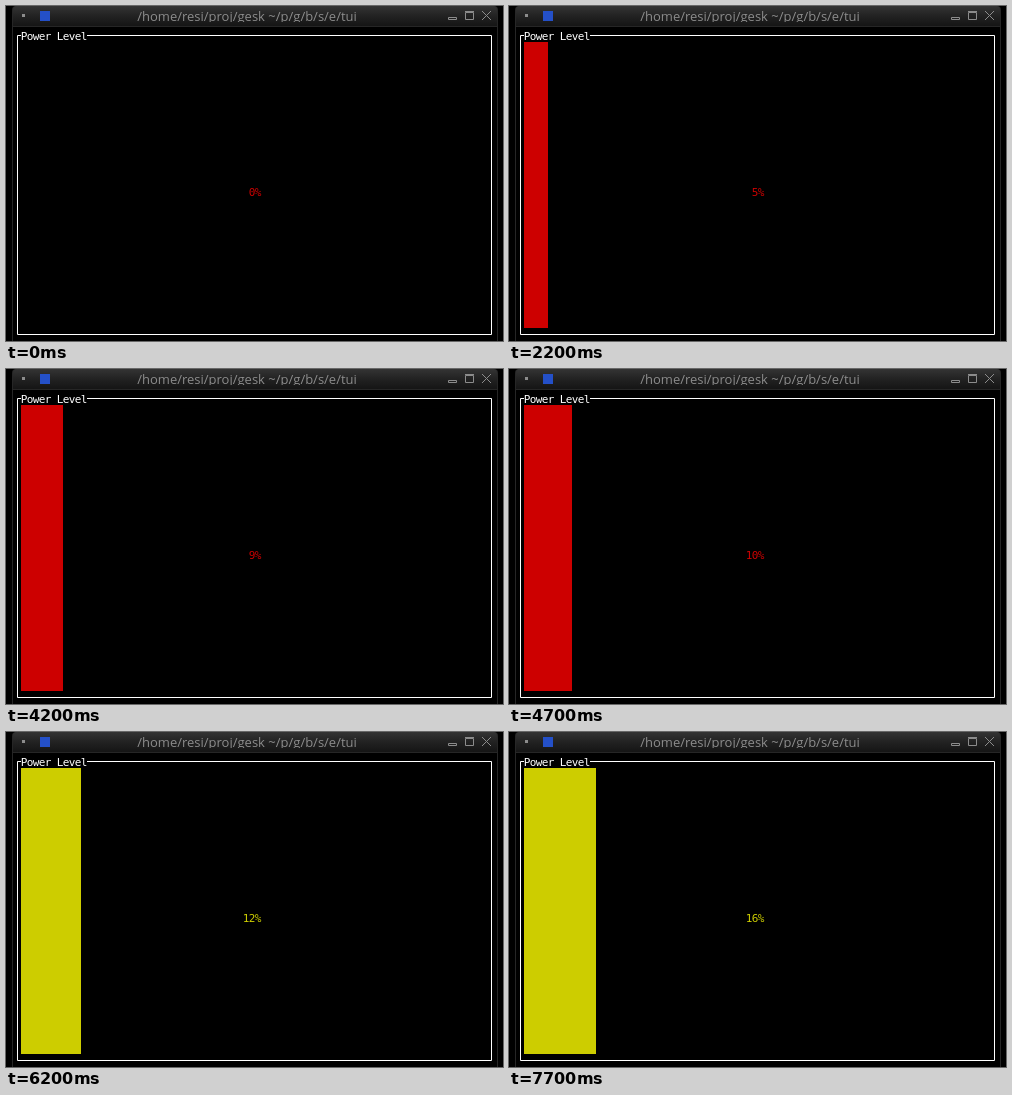
Animation of 497 by 335 pixels, one loop 8 s. Source, as an HTML page:

```html
<!DOCTYPE html>
<html lang="en">
<head>
<meta charset="utf-8">
<title>Power Level</title>
<style>
  html, body { margin: 0; width: 100%; height: 100%; overflow: hidden; background: #000; }
  svg { display: block; }
  .mono { font: 11px "DejaVu Sans Mono", monospace; letter-spacing: -.62px; }
  .title { font: 13px "Open Sans", sans-serif; fill: #8c8c8c; text-anchor: middle; }
  .button { fill: none; stroke: #8c8c8c; }
</style>
</head>
<body>
<svg width="497" height="335" viewBox="0 0 497 335">
  <defs>
    <linearGradient id="chrome" x2="0" y2="1">
      <stop stop-color="#343434"/>
      <stop offset=".5" stop-color="#222"/>
      <stop offset="1" stop-color="#151515"/>
    </linearGradient>
    <clipPath id="titleClip"><path d="M0 0H497V16H0Z"/></clipPath>
  </defs>

  <path d="M6 335V4Q6 0 10 0H488Q492 0 492 4V335Z" fill="#262626"/>
  <path d="M7 20V4Q7 0 11 0H487Q491 0 491 4V20Z" fill="url(#chrome)"/>
  <path d="M7 21H491V335H7Z"/>
  <path d="M16 8h3v3h-3z" fill="#8c8c8c"/>
  <path d="M34 5h10v10h-10z" fill="#2450c8"/>
  <g clip-path="url(#titleClip)">
    <text class="title" x="241" y="15">/home/resi/proj/gesk ~/p/g/b/s/e/tui</text>
  </g>
  <g class="button">
    <path d="M442.5 11.5h8v2h-8z"/>
    <path d="M459.5 6.5h8v7h-8zM459 5.5h9"/>
    <path d="M476 5l9 9m0-9l-9 9"/>
  </g>

  <path d="M15 29.5H11.5V328.5H485.5V29.5H81" fill="none" stroke="#fff"/>
  <text class="mono" x="14.7" y="34" fill="#fff">Power Level</text>
  <rect id="bar" x="15" y="36" height="286"/>
  <text id="label" class="mono" y="190"></text>
</svg>
<script>
  const LOOP = 8000, STEP = 500, FIRST_STEP = 200;
  const CELL = 6, COLUMNS = 78;
  const bar = document.getElementById('bar');
  const label = document.getElementById('label');

  // Repeated addition keeps the rounding that makes 10% show twice.
  function levelAt(time) {
    const steps = Math.floor((time - FIRST_STEP) / STEP) + 1;
    let level = 0;
    for (let i = 0; i < steps; i++) level += 0.01;
    return { steps, level };
  }

  function draw(now) {
    const { steps, level } = levelAt(now % LOOP);
    const percent = Math.floor(level * 100);
    const color = steps > 10 ? '#cdcd00' : '#cd0000';
    bar.setAttribute('width', Math.round(level * COLUMNS) * CELL);
    bar.setAttribute('fill', color);
    label.setAttribute('x', percent > 9 ? 236.7 : 242.7);
    label.setAttribute('fill', color);
    label.textContent = percent + '%';
    requestAnimationFrame(draw);
  }
  draw(0);
</script>
</body>
</html>
```
